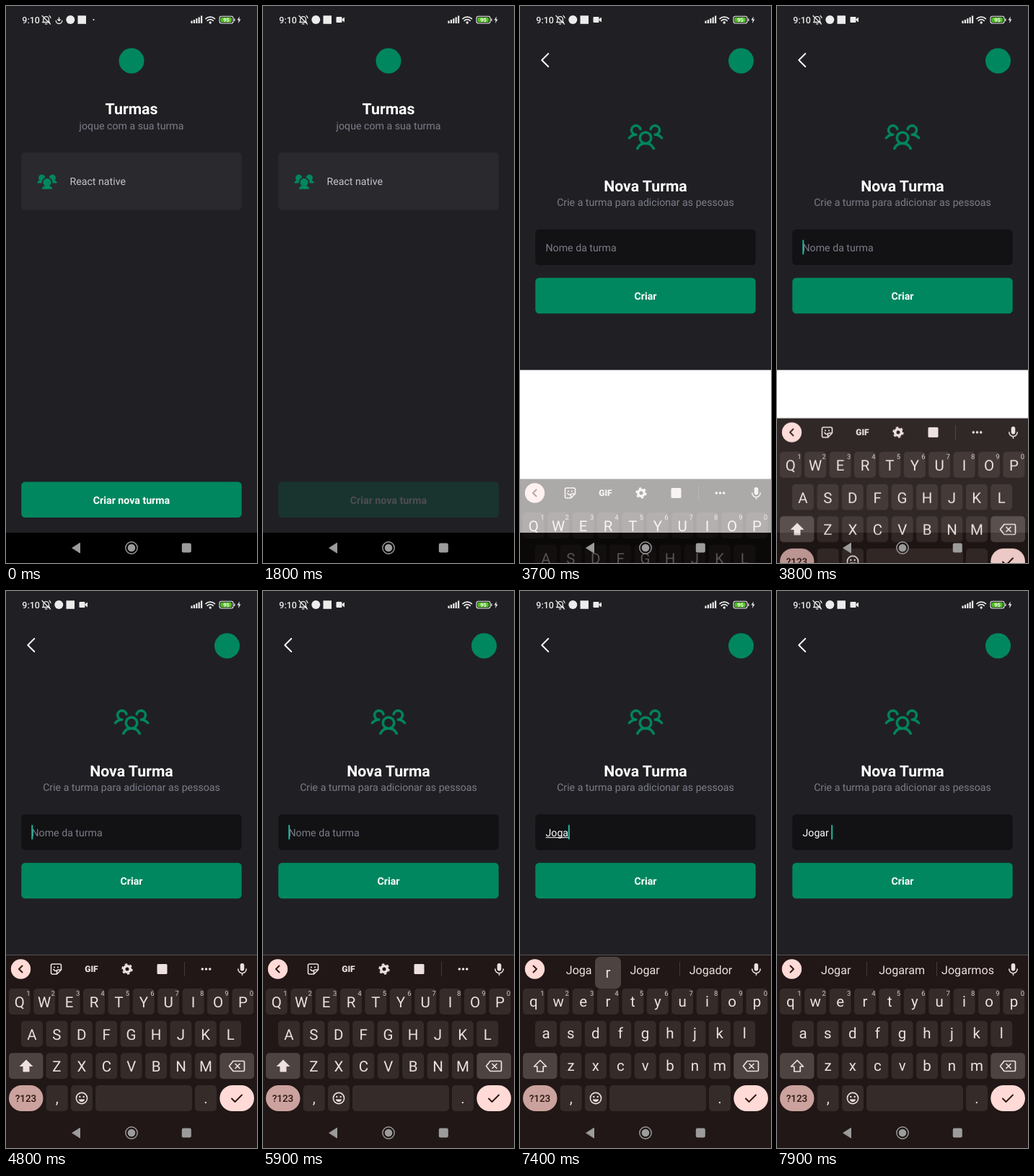
Write an HTML page that moves like this. It is 348 px wide and 772 px high and loops after 8000 ms.

```html
<!DOCTYPE html>
<html lang="pt-BR">
<head>
<meta charset="utf-8">
<title>Turmas</title>
<style>
  html, body { margin: 0; width: 100%; height: 100%; overflow: hidden; background: #000; }
  svg { display: block; width: 348px; height: 772px; font: 14.18px Roboto, sans-serif; }
  text { text-rendering: geometricPrecision; white-space: pre; }
  .mid { text-anchor: middle; }
  .title { font-size: 21.27px; font-weight: 700; fill: #fff; }
  .hint { fill: #7c7c8a; }
  .label { font-weight: 700; fill: #fff; }
  .line { fill: none; stroke-linecap: round; stroke-linejoin: round; }
  .letter { font-size: 20.5px; fill: #ede0de; text-anchor: middle; }
  .num { font-size: 9.5px; fill: #d8c9c6; text-anchor: middle; }
  .tip { font-size: 16.1px; fill: #ede0de; text-anchor: middle; }
  #press, #form, #formIn, #board, #drop { animation: 8s linear infinite; }

  #press { animation-name: press; }
  @keyframes press {
    0%, 21.24% { opacity: 1; }
    21.25% { opacity: .6; }
    22.375%, 100% { opacity: .2; }
  }
  #form { animation-name: enter; transform-origin: 174px 365px; }
  @keyframes enter {
    0%, 23.625% { opacity: 0; transform: scale(.88); }
    23.75% { opacity: .25; transform: scale(.9); }
    26%, 100% { opacity: 1; transform: none; }
  }
  #formIn { animation-name: lift; animation-timing-function: step-end; }
  @keyframes lift {
    0% { transform: none; }
    46.25%, 100% { transform: translateY(-113px); }
  }
  #board { animation-name: rise; }
  @keyframes rise {
    0%, 46.24% { opacity: 0; transform: translateY(151px); }
    46.25%, 46.9% { opacity: .37; transform: translateY(151px); animation-timing-function: ease-out; }
    47.75% { opacity: 1; transform: translateY(56px); animation-timing-function: ease-out; }
    50%, 100% { opacity: 1; transform: none; }
  }
  #drop { animation-name: drop; animation-timing-function: step-end; }
  @keyframes drop {
    0%, 5%, 12.5%, 18.75%, 100% { transform: none; }
    1.25%, 7.5%, 15% { transform: translateY(-2px); }
    2.5%, 8.75%, 16.25% { transform: translateY(-1px); }
  }
</style>
</head>
<body>
<svg viewBox="0 0 348 772">
  <rect width="348" height="772" fill="#000"/>
  <rect width="348" height="730" fill="#202024"/>

  <g id="home">
    <circle cx="174" cy="76" r="17.5" fill="#00875f"/>
    <text class="title mid" x="174" y="150">Turmas</text>
    <text class="hint mid" x="174" y="171">joque com a sua turma</text>
    <rect x="21.3" y="203" width="305.4" height="79.7" rx="5.3" fill="#29292e"/>
    <path fill="#00875f" transform="translate(42.3 228) scale(.115)" d="M64 148a4 4 0 0 1-4 4H16a8 8 0 0 1-6-13A68 68 0 0 1 37 117.500a40 40 0 1 1 66.500-36a4 4 0 0 1-2 4.400A64 64 0 0 0 64 148ZM246 139A68 68 0 0 0 219 117.500a40 40 0 1 0-66.500-36a4 4 0 0 0 2 4.400A64 64 0 0 1 192 148a4 4 0 0 0 4 4H240a8 8 0 0 0 6-13ZM157 182a48 48 0 1 0-58 0A72 72 0 0 0 65 212a8 8 0 0 0 7 12H184a8 8 0 0 0 7-12A72 72 0 0 0 157 182Z"/>
    <text x="88.500" y="248.300" fill="#c4c4cc">React native</text>
    <g id="press">
      <rect x="21.3" y="659.400" width="305.4" height="49.6" rx="5.3" fill="#00875f"/>
      <text class="label mid" x="174" y="690">Criar nova turma</text>
    </g>
  </g>

  <g id="form">
    <rect width="348" height="730" fill="#202024"/>
    <path class="line" d="M39.300 66l-9 9 9 9" stroke="#fff" stroke-width="1.9"/>
    <circle cx="306.5" cy="76" r="17.5" fill="#00875f"/>
    <g id="formIn">
      <path class="line" stroke="#00875f" stroke-width="18" transform="translate(149.200 268.700) scale(.1937)" d="M168 140a40 40 0 1 1-80 0a40 40 0 1 1 80 0M196 116a60 60 0 0 1 48 24M12 140a60 60 0 0 1 48-24M70 216a64 64 0 0 1 116 0M60 116A32 32 0 1 1 91 78M165 78A32 32 0 1 1 196 116"/>
      <text class="title mid" x="174" y="369.500">Nova Turma</text>
      <text class="hint mid" x="174" y="390">Crie a turma para adicionar as pessoas</text>
      <rect x="21.3" y="422.5" width="305.4" height="49.6" rx="5.3" fill="#121214"/>
      <g id="field"></g>
      <rect x="21.3" y="489.7" width="305.4" height="49.6" rx="5.3" fill="#00875f"/>
      <text class="label mid" x="174" y="520.300">Criar</text>
    </g>
    <rect id="blank" y="504.5" width="348" height="225.5" fill="#fff"/>
  </g>

  <rect y="730" width="348" height="42" fill="#000"/>

  <g id="board">
    <rect y="504.5" width="348" height="267.500" fill="#201716"/>
    <g id="keys"></g>
    <circle cx="20.500" cy="524" r="13.700" fill="#ffdad6"/>
    <g id="tools" fill="#ede0de">
      <path class="line" d="M22.500 519.500l-4.500 4.500 4.500 4.500" stroke="#2c1512" stroke-width="1.900"/>
      <path class="line" d="M64.500 517h10a2 2 0 0 1 2 2v6l-6 6h-6a2 2 0 0 1-2-2v-10a2 2 0 0 1 2-2zM76.500 525h-4a2 2 0 0 0-2 2v4M66 524.500q2 3 4 1.500" stroke="#ede0de" stroke-width="1.600"/>
      <circle cx="67" cy="521.500" r="1.100"/><circle cx="72" cy="521.500" r="1.100"/>
      <text class="mid" x="118.500" y="528.300" font-size="12" font-weight="900">GIF</text>
      <circle cx="168" cy="524" r="4.300" fill="none" stroke="#ede0de" stroke-width="3.600"/>
      <circle cx="168" cy="524" r="6.700" fill="none" stroke="#ede0de" stroke-width="2" stroke-dasharray="3.500 3.516"/>
      <rect x="209.500" y="517" width="14" height="14" rx="1.500"/>
      <rect x="247" y="514" width="1" height="20" fill="#463a38"/>
      <circle cx="272.300" cy="524" r="1.800"/><circle cx="277.500" cy="524" r="1.800"/><circle cx="282.700" cy="524" r="1.800"/>
    </g>
    <g id="tips">
      <path class="line" d="M18.500 519.500l4.500 4.500-4.500 4.500" stroke="#2c1512" stroke-width="1.900"/>
      <path d="M124.500 514v20M221.500 514v20" stroke="#463a38"/>
    </g>
    <rect x="324.700" y="516" width="5.600" height="10.500" rx="2.800" fill="#ede0de"/>
    <path class="line" d="M321.800 524a5.700 5.700 0 0 0 11.400 0M327.500 529.700v2.500" stroke="#ede0de" stroke-width="1.600"/>
    <path id="shiftOn" fill="#ede0de" d="M28 649.500l9.500 9.500h-5v7.500h-9V659h-5z"/>
    <path id="shiftOff" class="line" stroke="#ede0de" stroke-width="1.700" d="M28 650.500l8.500 8.500h-4.300v7h-8.400v-7h-4.300z"/>
    <path class="line" stroke="#ede0de" stroke-width="1.700" d="M315 651.500h14a1.500 1.500 0 0 1 1.500 1.500v11a1.500 1.500 0 0 1-1.500 1.500H315l-5.500-7zM318 655.500l6 6M324 655.500l-6 6"/>
    <text class="mid" x="27.500" y="708" font-size="13.500" font-weight="500" fill="#2c1512">?123</text>
    <text class="letter" x="70.700" y="710">,</text>
    <text class="letter" x="277" y="710">.</text>
    <circle cx="105" cy="703" r="7.600" fill="none" stroke="#ede0de" stroke-width="1.600"/>
    <circle cx="102.300" cy="701" r="1.200" fill="#ede0de"/><circle cx="107.700" cy="701" r="1.200" fill="#ede0de"/>
    <path d="M100.800 704.500h8.400a4.300 4.300 0 0 1-8.400 0z" fill="#ede0de"/>
    <path class="line" d="M313 703.500l4.500 4.500 9.500-9.500" stroke="#2c1512" stroke-width="1.900"/>
    <g id="bubbles"></g>
  </g>

  <g fill="#9c9c9c">
    <path class="line" style="fill:#9c9c9c" d="M92 751l10.500-6.700v13.400z" stroke="#9c9c9c"/>
    <circle cx="174" cy="751" r="8.200" fill="none" stroke="#9c9c9c" stroke-width="1.400"/>
    <circle cx="174" cy="751" r="5.300"/>
    <rect x="243.800" y="744.500" width="13" height="13" rx="2.200"/>
  </g>

  <g id="status" fill="#ececec">
    <text x="22.300" y="23.700" font-size="12.500" font-weight="500">9:10</text>
    <path class="line" d="M50.500 22.500h10M51.800 22.500v-4a3.800 3.800 0 0 1 7.600 0v4M54.500 24.800h2.300M50 13.500l11.500 11.500M60 13.500q1.700 1.200 2 3" stroke="#ececec" stroke-width="1.300"/>
    <g id="before">
      <path id="drop" class="line" d="M73.500 16v4.500M71.700 18.700l1.800 1.800 1.800-1.800" stroke="#ececec" stroke-width="1.300"/>
      <path class="line" d="M69.300 20.500a4.200 4 0 0 0 8.400 0" stroke="#ececec" stroke-width="1.400"/>
      <circle cx="89.300" cy="19" r="6"/>
      <rect x="99.500" y="13.300" width="11.500" height="11.500"/>
      <circle cx="121.500" cy="19" r="1.100"/>
    </g>
    <g id="after">
      <circle cx="73.300" cy="19" r="6"/>
      <rect x="83.500" y="13.300" width="11.500" height="11.500"/>
      <rect x="101.500" y="15" width="8" height="8" rx="1"/>
      <path d="M109.500 18.300l3.500-2.800v7l-3.500-2.800z"/>
    </g>
    <path d="M257.500 24v-3.500M260.900 24v-5M264.300 24v-6.700M267.700 24v-8.500M271.100 24v-10.500" stroke="#ececec" stroke-width="2.200"/>
    <path class="line" d="M277 17.700a8.800 8.800 0 0 1 12.400 0M279.200 20.300a5.700 5.700 0 0 1 8 0" stroke="#ececec" stroke-width="1.700"/>
    <circle cx="283.200" cy="23" r="1.700"/>
    <rect x="296" y="14.200" width="19" height="9.800" rx="2.700" fill="none" stroke="#ececec" stroke-width="1.100"/>
    <rect x="297.500" y="15.700" width="15.500" height="6.800" rx="1.500" fill="#4fc01e"/>
    <rect x="316.200" y="17.200" width="1.300" height="4" rx=".6"/>
    <text class="mid" x="305.500" y="22" font-size="7.500" font-weight="700" fill="#fff">95</text>
    <path d="M323.800 14.500l-3.300 5h2.200l-.7 4.500 3.500-5.500h-2.200z"/>
  </g>
</svg>

<script>
const LOOP = 8000;
const $ = id => document.getElementById(id);
const sheet = document.head.appendChild(document.createElement('style'));
let count = 0;

function add(parent, tag, attrs, text) {
  const el = document.createElementNS('http://www.w3.org/2000/svg', tag);
  for (const k in attrs) el.setAttribute(k, attrs[k]);
  if (text) el.textContent = text;
  return parent.appendChild(el);
}

// Shows an element only within the given [start, end] spans
function during(el, ...spans) {
  const name = 'show' + count++;
  const at = (t, o) => `${t / LOOP * 100}%{opacity:${o}}`;
  const steps = spans.map(([a, b]) => at(a, 1) + at(b, 0)).join('');
  sheet.append(`@keyframes ${name}{${at(0, 0)}${steps}}\n`);
  el.style.animation = `${name} ${LOOP}ms step-end infinite`;
}

// Keyboard
const TYPED = 6500, KEY = '#352b29', FUNC = '#4d4341';
const rows = [['qwertyuiop', 18.8, 551], ['asdfghjkl', 36, 595.7], ['zxcvbnm', 70.5, 640.3]];
const keys = $('keys'), upper = add(keys, 'g'), lower = add(keys, 'g'), place = {};
const cap = (x, y, width, fill, rx = 5) =>
  keys.insertBefore(add(keys, 'rect', { x, y, width, height: 36, rx, fill }), upper);

for (const [chars, x0, y] of rows) {
  [...chars].forEach((c, i) => {
    const x = x0 + i * 34.4;
    place[c] = { x, y };
    cap(x - 15, y, 30, KEY);
    add(upper, 'text', { class: 'letter', x, y: y + 26 }, c.toUpperCase());
    add(lower, 'text', { class: 'letter', x, y: y + 24.5 }, c);
    if (y === 551) add(keys, 'text', { class: 'num', x: x + 12, y: y + 10 }, String((i + 1) % 10));
  });
}
cap(4, 640.3, 47.5, FUNC);
cap(296.3, 640.3, 47.7, FUNC);
cap(4, 685, 47.5, '#cba29d', 18);
cap(55.7, 685, 30, KEY);
cap(90, 685, 30, KEY);
cap(124, 685, 134, KEY);
cap(262, 685, 30, KEY);
cap(296.3, 685, 47.7, '#ffdad6', 18);
during(cap(124, 685, 134, FUNC), [7800, 7900]);

// Pressed keys with their preview
const presses = [['j', 6400, 6500, 'J'], ['o', 6700, 6800], ['g', 7100, 7200], ['a', 7300, 7400], ['r', 7400, 7500]];
for (const [c, from, to, shown = c] of presses) {
  const { x, y } = place[c], g = add($('bubbles'), 'g');
  add(g, 'rect', { x: x - 18, y: y - 44, width: 36, height: 44, rx: 7, fill: FUNC });
  add(g, 'text', { class: 'letter', x, y: y - 15 }, shown);
  during(g, [from, to]);
}

// Text field: text, start, end, underlined while composing
const field = $('field');
const caret = x => add(field, 'rect', { x, y: 437.3, width: 2, height: 20, fill: '#24b39b' });
during(add(field, 'text', { class: 'hint', x: 35.5, y: 452.7 }, 'Nome da turma'), [0, TYPED]);
during(caret(35.3), [3800, 4300], [4800, 5400], [5900, TYPED]);

const typing = [['J', TYPED, 6800], ['Jo', 6800, 7200], ['Jog', 7200, 7400], ['Joga', 7400, 7500], ['Jogar', 7500, 7900], ['Jogar ', 7900, LOOP]];
for (const [word, from, to] of typing) {
  const text = add(field, 'text', { x: 35.5, y: 452.7, fill: '#fff' }, word);
  const width = text.getComputedTextLength();
  const parts = [text, caret(35.3 + width)];
  if (!word.endsWith(' ')) parts.push(add(field, 'rect', { x: 35.7, y: 454.2, width, height: 1, fill: '#fff' }));
  parts.forEach(el => during(el, [from, to]));
}

// Suggestions
const tips = [['J Já Jogo', TYPED, 6800], ['Jo Jô Jogo', 6800, 7200], ['Jog Jogo Jogos', 7200, 7400], ['Joga Jogar Jogador', 7400, 7500], ['Jogar Jogaram Jogarmos', 7500, LOOP]];
for (const [words, from, to] of tips) {
  const g = add($('tips'), 'g');
  words.split(' ').forEach((w, i) => add(g, 'text', { class: 'tip', x: 81.7 + i * 91.4, y: 530.5 }, w));
  during(g, [from, to]);
}

['tools', 'shiftOn'].forEach(id => during($(id), [0, TYPED]));
['tips', 'shiftOff'].forEach(id => during($(id), [TYPED, LOOP]));
during(upper, [0, TYPED]);
during(lower, [TYPED, LOOP]);
during($('before'), [0, 1700]);
during($('after'), [1700, LOOP]);
during($('blank'), [3700, LOOP]);
</script>
</body>
</html>
```
